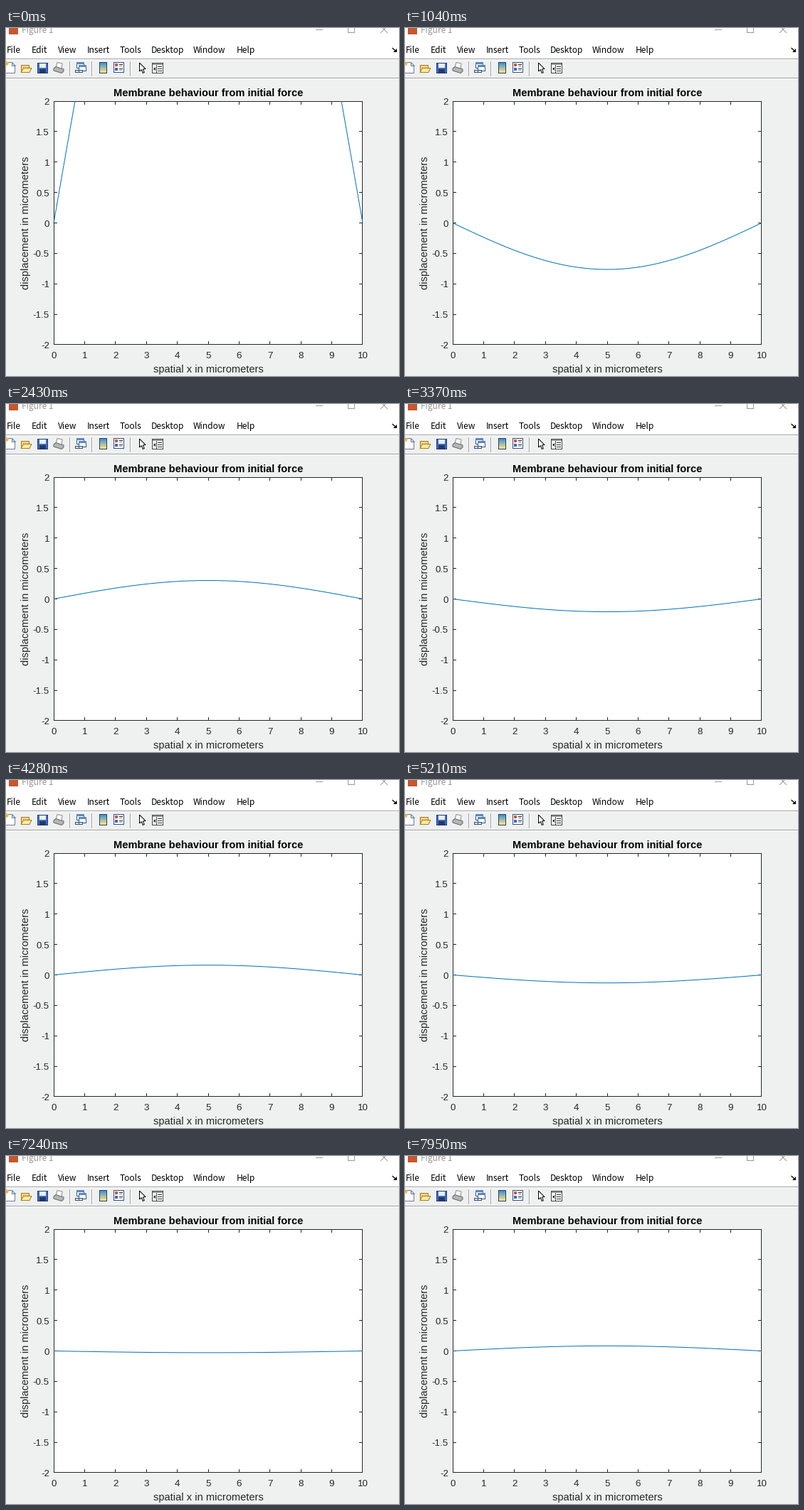
Recreate the animation shown at these times as a matplotlib script. Size 552 by 490 pixels, loop 8 s.

```python
import math

import matplotlib.pyplot as plt
import numpy as np
from matplotlib.animation import FuncAnimation
from matplotlib.colors import to_rgb
from matplotlib.patches import Circle, Polygon, Rectangle

W, H, DPI = 552, 490, 100
PX = 72 / DPI  # points per pixel
LOOP, TICK = 8000, 20

LEFT, RIGHT, TOP, BOTTOM = 67, 501, 103, 446
X_UNIT = (RIGHT - LEFT) / 10
Y_UNIT = (BOTTOM - TOP) / 4
ZERO = (TOP + BOTTOM) / 2

GREY, INK, BLUE = "#eff0f0", "#262626", "#0072bd"
PALE, SHADE, STEEL = "#999999", "#a0a0a0", "#35557f"
UI, PLOT = "Noto Sans CJK JP", "Liberation Sans"

fig = plt.figure(figsize=(W / DPI, H / DPI), dpi=DPI, facecolor=GREY)
ax = fig.add_axes([0, 0, 1, 1])
ax.set_xlim(0, W)
ax.set_ylim(H, 0)
ax.axis("off")


def box(x, y, w, h, color):
    """Crisp filled rectangle on whole pixels."""
    ax.add_patch(Rectangle((x, y), w, h, facecolor=color, linewidth=0, antialiased=False))


def frame(x, y, w, h, edge, fill="white"):
    box(x, y, w, h, edge)
    box(x + 1, y + 1, w - 2, h - 2, fill)


def poly(points, fill, edge="none"):
    ax.add_patch(Polygon(points, facecolor=fill, edgecolor=edge, linewidth=PX))


def stroke(xs, ys, color, width=1):
    return ax.plot(xs, ys, color=color, lw=width * PX, solid_capstyle="butt")[0]


def label(x, y, s, px, font=PLOT, color=INK, **kw):
    ax.text(x, y, s, fontsize=px * PX, family=font, color=color, **kw)


def blend(a, b, t):
    return tuple((1 - t) * np.array(to_rgb(a)) + t * np.array(to_rgb(b)))


def draw_title_bar():
    box(0, 0, W, 43, "white")
    box(4, 0, 13, 9, "#c8562e")
    label(22, 7, "Figure 1", 12, UI, PALE)
    box(435, 2, 10, 1, PALE)
    frame(480, -4, 10, 11, PALE)
    stroke([526, 536], [-3, 7], PALE)
    stroke([526, 536], [7, -3], PALE)


def draw_menu():
    menu = {"File": 1, "Edit": 36, "View": 73, "Insert": 114,
            "Tools": 160, "Desktop": 204, "Window": 263, "Help": 324}
    for name, x in menu.items():
        label(x, 35, name, 12, UI, "black")
    stroke([542.5, 547.5], [28, 32.5], "black", 1.3)
    poly([(549, 29), (549, 34), (544, 34)], "black")


def draw_toolbar():
    for y in (43, 70):
        box(0, y, W, 1, SHADE)
        box(0, y + 1, W, 1, "white")
    for x in (89, 120, 174):
        box(x, 47, 1, 21, SHADE)
        box(x + 1, 47, 1, 21, "white")
    draw_file_icons()
    draw_plot_icons()


def draw_file_icons():
    # new
    poly([(-1, 48.5), (8, 48.5), (12.5, 53), (12.5, 63.5), (-1, 63.5)], "white", "#6b7f9e")
    poly([(8, 48.5), (8, 53), (12.5, 53)], "#d5deeb", "#6b7f9e")
    ax.add_patch(Circle((1, 50), 2.6, facecolor="#f2b53a", linewidth=0))
    # open
    frame(21, 52, 12, 11, "#a67c21", "#f3d37a")
    poly([(21, 62.5), (24.5, 56.5), (36, 56.5), (33, 62.5)], "#fdeaa6", "#a67c21")
    # save
    frame(44, 49, 15, 15, "#1f3f86", "#3f6dc0")
    box(47, 50, 9, 6, "#e8f0fa")
    box(47, 58, 9, 6, "#23376b")
    # print
    poly([(70, 56), (72, 48.5), (79, 50), (78, 58)], "white", "#8a8a8a")
    poly([(67, 57), (70, 54.5), (81, 58), (81, 61), (78, 63.5), (67, 60)], "#b5b5b5", "#666666")


def draw_plot_icons():
    # link
    for x, y in ((99, 48), (102, 52)):
        frame(x, y, 11, 9, STEEL)
        box(x, y, 11, 3, "#5b87c0")
    for x in (97, 102):
        frame(x, 59, 6, 4, STEEL, "#d5deeb")
    # colour bar
    frame(131, 48, 11, 16, "#23406e")
    for i in range(14):
        box(132, 49 + i, 9, 1, blend("#4a90d0", "#f6e680", i / 13))
    # legend
    frame(151, 48, 15, 15, STEEL)
    for y, color in ((50, "#d2553b"), (56, "#3c66c4")):
        box(153, y, 4, 4, color)
        box(159, y + 1, 5, 1, INK)
        box(159, y + 3, 4, 1, PALE)
    # pointer
    poly([(187.5, 49), (187.5, 61), (190.3, 58.6), (192.3, 63.5), (194.3, 62.6),
          (192.3, 57.9), (196, 57.6)], "white", "black")
    # inspector
    frame(205, 49, 16, 15, "#444444")
    box(206, 50, 14, 2, PALE)
    box(211, 52, 1, 11, "#444444")
    poly([(207, 57.5), (210, 55), (210, 60)], INK)
    for y in (54, 57, 60):
        box(213, y, 6, 1, INK)


def draw_axes():
    frame(LEFT, TOP, RIGHT - LEFT, BOTTOM - TOP, INK)
    for k in range(11):
        x = LEFT + k * X_UNIT
        col = min(int(x), RIGHT - 1)
        box(col, TOP, 1, 5, INK)
        box(col, BOTTOM - 5, 1, 5, INK)
        label(x, 465, str(k), 13.33, ha="center")
    for k in range(9):
        y = TOP + k * Y_UNIT / 2
        row = min(int(y), BOTTOM - 1)
        box(LEFT, row, 5, 1, INK)
        box(RIGHT - 5, row, 5, 1, INK)
        label(61, y + 5, f"{2 - k / 2:g}", 13.33, ha="right")
    label(284, 96, "Membrane behaviour from initial force", 14.67,
          color="black", weight="bold", ha="center")
    label(284, 485, "spatial x in micrometers", 14.67, ha="center")
    label(32, ZERO, "displacement in micrometers", 14.67, rotation=90,
          ha="center", va="baseline", rotation_mode="anchor")


START, REDRAW = 500, 77.2  # ms before the first redraw, ms between redraws


def step_at(ms):
    """Simulation step on show; about every sixth redraw repeats the last step."""
    if ms < START:
        return 0
    redraws = int((ms - START) / REDRAW)
    return redraws + 1 - int((redraws + 0.6) / 6.15)


def amplitude(step):
    """Mid-point displacement: a swing of 20 steps fading as 1/t."""
    swing = 9.05 / (step + 0.7) * math.sin(math.tau * (step - 14.75) / 20)
    return min(swing, 9.3)


draw_title_bar()
draw_menu()
draw_toolbar()
draw_axes()

xs = np.linspace(0, 10, 101)
mode = np.sin(np.pi * xs / 10)
curve = stroke(LEFT + xs * X_UNIT, 0 * xs, BLUE)
curve.set_zorder(5)
curve.set_clip_path(Rectangle((LEFT - 1, TOP), RIGHT - LEFT + 2, BOTTOM - TOP,
                              transform=ax.transData))


def update(i):
    step = step_at((i + 0.5) * TICK)
    curve.set_ydata(ZERO - Y_UNIT * amplitude(step) * mode)
    return (curve,)


anim = FuncAnimation(fig, update, frames=LOOP // TICK, interval=TICK,
                     repeat=True, repeat_delay=0, blit=False)
plt.show()
```
